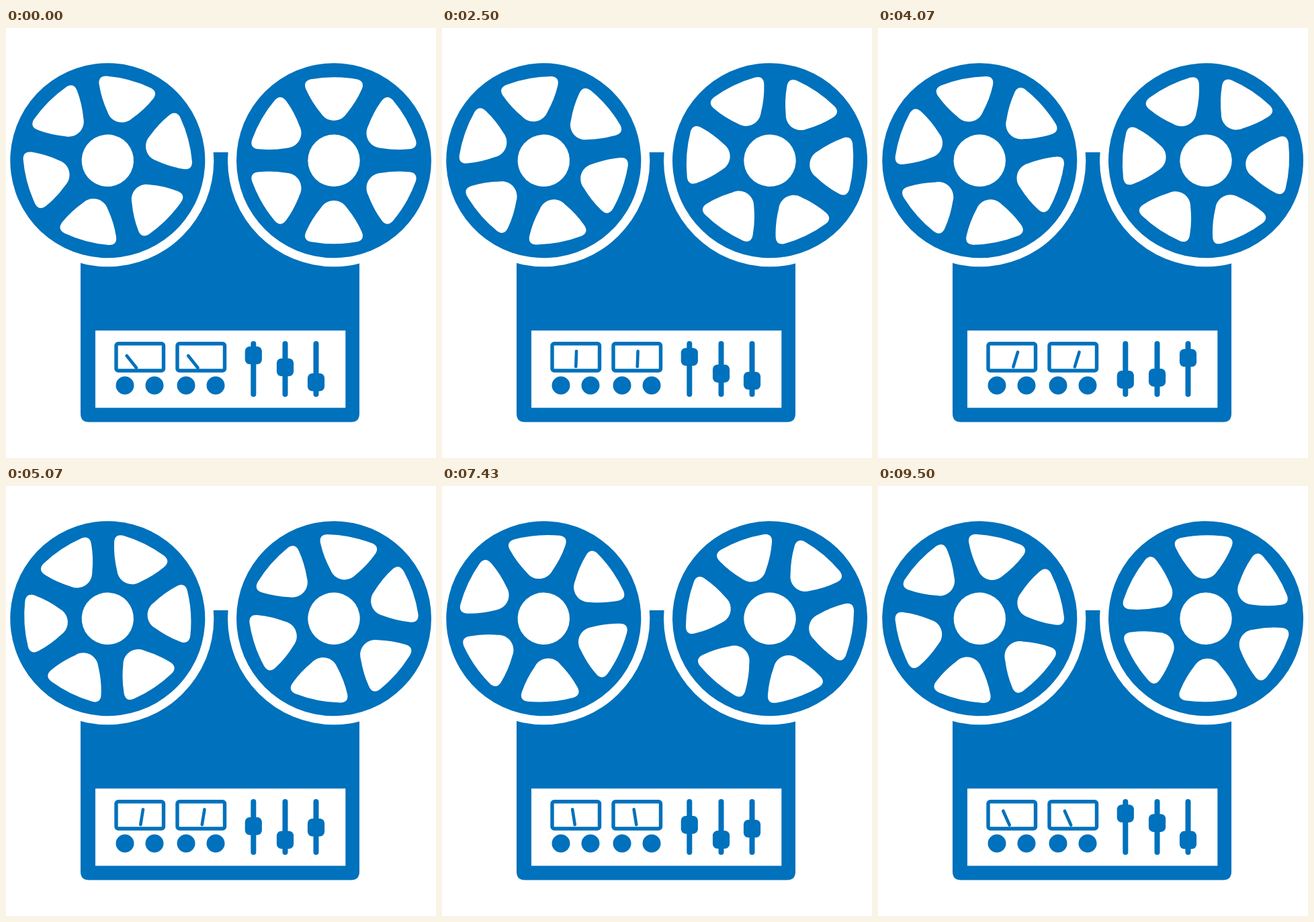
An HTML page for the animation above (9570 ms loop, 640 by 640 pixels).

```html
<!DOCTYPE html>
<html lang="en">
<head>
<meta charset="utf-8">
<title>Reel to reel</title>
<style>
  html, body { margin: 0; width: 100%; height: 100%; overflow: hidden; background: #fff; }
  svg { display: block; width: 100vw; height: 100vh; }
  .ink { fill: #0071bc; }
  .paper { fill: #fff; }
  .line { fill: none; stroke: #0071bc; stroke-linecap: round; }
</style>
</head>
<body>
<svg viewBox="0 0 640 640">
  <defs>
    <path id="hole" d="M-34-121Q0-127 34-121C43-119 45-113 41-105Q33-87 19-70C10-56-10-56-19-70Q-33-87-41-105C-45-113-43-119-34-121Z"/>
    <g id="reel">
      <circle class="ink" r="145"/>
      <g id="holes" class="paper">
        <circle r="38.7"/>
        <use href="#hole"/>
        <use href="#hole" transform="rotate(60)"/>
        <use href="#hole" transform="rotate(120)"/>
        <use href="#hole" transform="rotate(180)"/>
        <use href="#hole" transform="rotate(240)"/>
        <use href="#hole" transform="rotate(300)"/>
      </g>
    </g>
    <g id="meter">
      <rect class="line" x="164" y="469.7" width="70.5" height="40.3" rx="3" stroke-width="5.4"/>
      <circle class="ink" cx="177" cy="532" r="13.5"/>
      <circle class="ink" cx="221" cy="532" r="13.5"/>
    </g>
    <path id="needle" class="line" d="M0-8V-31" stroke-width="4.6"/>
    <path id="track" class="line" d="M0 470V545" stroke-width="8"/>
    <rect id="thumb" class="ink" x="-12.6" y="-13.3" width="25.2" height="26.6" rx="7"/>
  </defs>

  <path class="ink" d="M111 185H526V574Q526 586.5 513.5 586.5H123.500Q111 586.500 111 574Z"/>
  <circle class="paper" cx="151.300" cy="197.300" r="158"/>
  <circle class="paper" cx="488" cy="197.300" r="158"/>
  <use class="reel" href="#reel"/>
  <use class="reel" href="#reel"/>

  <rect class="paper" x="133" y="450.300" width="372.300" height="115"/>
  <use href="#meter"/>
  <use href="#meter" x="91"/>
  <use class="needle" href="#needle"/>
  <use class="needle" href="#needle"/>
  <use href="#track" x="368.300"/>
  <use href="#track" x="415.500"/>
  <use href="#track" x="461.500"/>
  <use class="thumb" href="#thumb"/>
  <use class="thumb" href="#thumb"/>
  <use class="thumb" href="#thumb"/>
</svg>
<script>
  const LOOP = 9570, FPS = 14, STEPS = 134;
  const all = name => [...document.querySelectorAll('.' + name)];
  const reels = all('reel'), needles = all('needle'), thumbs = all('thumb');

  // Needle swing: [phase, degrees]
  const SWING = [[0, -38.5], [0.139, -9], [0.173, -9], [0.394, 17], [0.6, 20],
                 [0.768, 2], [0.802, -9.5], [0.918, -24], [1, -38.5]];

  function swing(phase) {
    const i = SWING.findIndex(([p]) => p > phase);
    const [p0, a0] = SWING[i - 1], [p1, a1] = SWING[i];
    return a0 + (a1 - a0) * (phase - p0) / (p1 - p0);
  }

  function place(el, x, y, angle = 0) {
    el.setAttribute('transform', `translate(${x} ${y}) rotate(${angle})`);
  }

  function draw(step) {
    const turn = step * 2.694;
    place(reels[0], 151.3, 197.3, 15 + turn);
    place(reels[1], 488, 197.3, turn);

    const tilt = swing(step * 0.1648 % 1);
    place(needles[0], 199, 512, tilt);
    place(needles[1], 290.5, 512, tilt);

    const w = Math.max(0, step - 0.5) / 16.62 * 2 * Math.PI;
    place(thumbs[0], 368.3, 507.2 - 20 * Math.cos(w));
    place(thumbs[1], 415.5, 507 + 20 * Math.sin(w - 0.1));
    place(thumbs[2], 461.5, 507.2 + 20 * Math.cos(w));
  }

  const start = performance.now();
  function tick(now) {
    const t = Math.max(0, now - start) % LOOP;
    draw(Math.min(STEPS - 1, Math.floor((t + 5) * FPS / 1000)));
    requestAnimationFrame(tick);
  }
  draw(0);
  requestAnimationFrame(tick);
</script>
</body>
</html>
```
